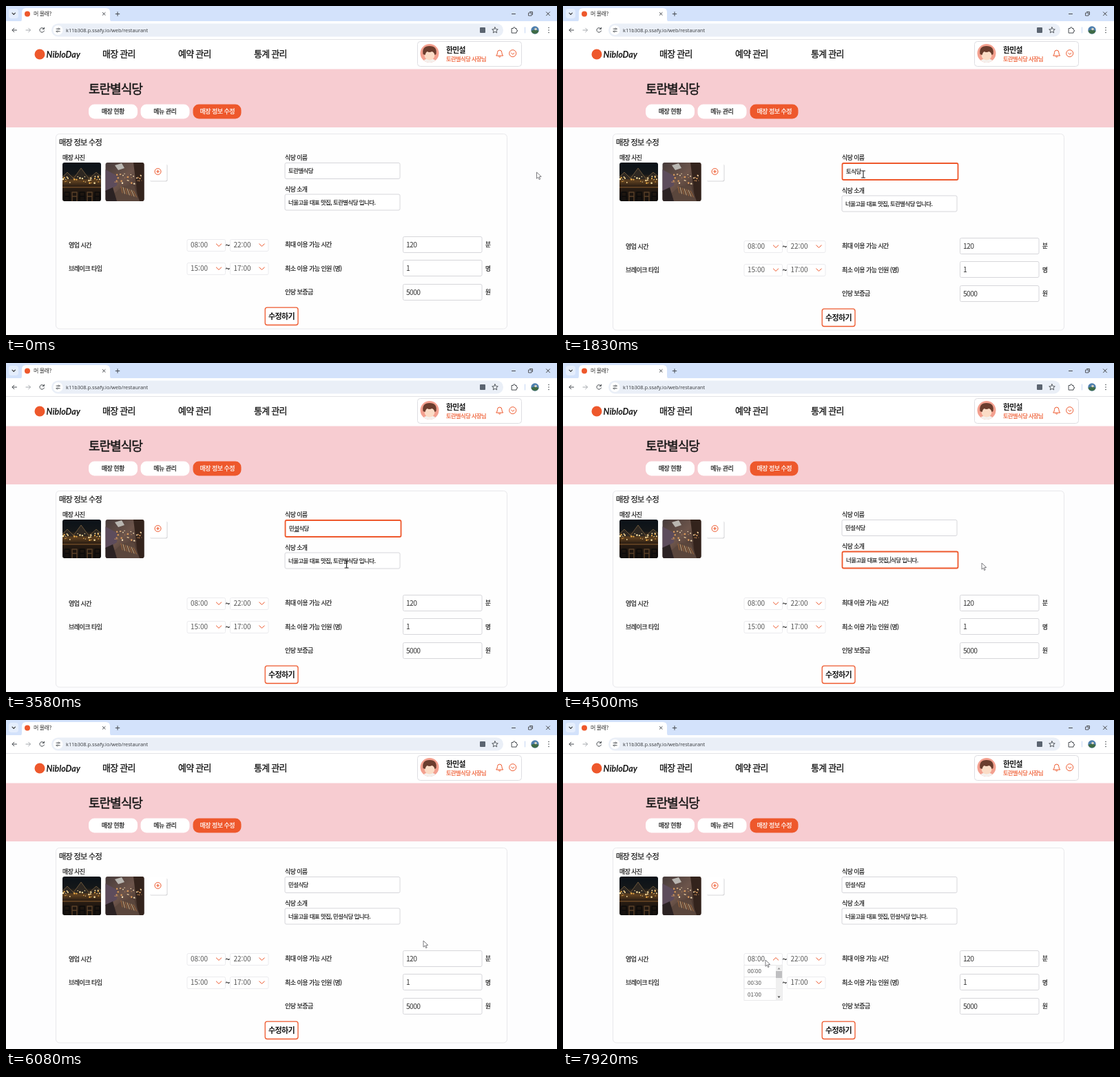
An HTML page that plays this animation: 800x477 px, repeating every 8 s.

```html
<!DOCTYPE html>
<html lang="ko">
<head>
<meta charset="utf-8">
<title>매장 정보 수정</title>
<style>
html, body { margin: 0; width: 100%; height: 100%; overflow: hidden; background: #fff; }
svg { display: block; width: 800px; height: 477px; }
text { font-family: "Noto Sans CJK KR", "Noto Sans CJK", "Noto Sans KR", sans-serif; letter-spacing: -.06em; white-space: pre; }
.num { letter-spacing: 0; }
.url { font-family: "Open Sans", sans-serif; letter-spacing: 0; }
.brand { font-family: Lato, sans-serif; font-style: italic; letter-spacing: 0; }
</style>
</head>
<body>
<svg id="stage" viewBox="0 0 800 477">
  <defs>
    <linearGradient id="night" x2="0" y2="1">
      <stop offset="0" stop-color="#0b1219"/><stop offset=".3" stop-color="#141719"/>
      <stop offset=".48" stop-color="#5e4020"/><stop offset=".62" stop-color="#2a1d13"/>
      <stop offset="1" stop-color="#120f0d"/>
    </linearGradient>
    <linearGradient id="hall" x2="1" y2="1">
      <stop offset="0" stop-color="#453a3a"/><stop offset=".45" stop-color="#6d554b"/>
      <stop offset="1" stop-color="#2a1c16"/>
    </linearGradient>
    <clipPath id="clipA"><rect x="82" y="227" width="56" height="56" rx="3"/></clipPath>
    <clipPath id="clipB"><rect x="144.500" y="227" width="56" height="56" rx="3"/></clipPath>
    <clipPath id="face"><circle cx="615" cy="68.500" r="13.500"/></clipPath>
  </defs>
</svg>
<script>
const NS = 'http://www.w3.org/2000/svg';
const LOOP = 8000;
const ORANGE = '#ee582c', INK = '#161616', GREY = '#474b50', EDGE = '#d6d6da';
const SHOP = '토란별', NEXT = '민설', INTRO = '너울고을 대표 맛집, ';
const stage = document.getElementById('stage');
let layer = stage;

function el(tag, attrs) {
  const node = document.createElementNS(NS, tag);
  for (const k in attrs) node.setAttribute(k, attrs[k]);
  layer.appendChild(node);
  return node;
}
const rect = (x, y, width, height, fill, rx = 0, more) =>
  el('rect', { x, y, width, height, fill, rx, ...more });
const circle = (cx, cy, r, fill, more) => el('circle', { cx, cy, r, fill, ...more });
const line = (d, stroke = GREY, width = 1, more) =>
  el('path', { d, stroke, fill: 'none', 'stroke-width': width, 'stroke-linecap': 'round', 'stroke-linejoin': 'round', ...more });
const shape = (d, fill, more) => el('path', { d, fill, ...more });
const box = (x, y, w, h, rx, stroke, width = 1) =>
  rect(x, y, w, h, '#fff', rx, { stroke, 'stroke-width': width });
function text(x, mid, size, str, fill = INK, more = {}) {
  const node = el('text', { x, y: mid + size * .37, 'font-size': size, fill, ...more });
  // a hairline outline stands in for the medium weight
  if (more['font-weight'] === 500) {
    node.setAttribute('stroke', fill);
    node.setAttribute('stroke-width', size * .022);
  }
  node.textContent = str;
  return node;
}
function group(parent = stage, attrs) {
  layer = parent;
  return layer = el('g', attrs);
}
const MED = { 'font-weight': 500 }, BOLD = { 'font-weight': 700 };
const NUM = { class: 'num' }, MID = { 'text-anchor': 'middle', 'font-weight': 500 };

function random(seed) {
  return () => (seed = (seed * 16807) % 2147483647) / 2147483647;
}

function drawBrowser() {
  rect(0, 0, 800, 24, '#d3e2fb');
  rect(4, 4, 14, 14, '#e5eefd', 4);
  line('M9 10.2l2.200 2.200 2.200-2.200', '#333', 1.1);
  shape('M19 23q4 0 4-4V9q0-6 6-6H145q6 0 6 6v10q0 4 4 4z', '#fff');
  circle(31, 11.5, 4, ORANGE);
  text(40, 11.5, 8, '머 물래?', '#333');
  line('M140.300 9.500l3.800 3.800m0-3.800l-3.800 3.800');
  line('M159.200 11.500h5.600m-2.800-2.800v5.600');
  line('M734.500 11.500h5', '#333', .9);
  line('M759 10h4v4h-4zM760.500 8.500h4v4', '#333', .8);
  line('M784.500 8.800l5 5m0-5l-5 5', '#333', .9);
  rect(0, 22, 800, 26, '#fff');
  line('M0 48.500H800', '#e3e3e6');
  line('M15.500 35H9m2.800-2.800L9 35l2.800 2.800');
  line('M29 35h6.500m-2.800-2.800L35.500 35l-2.800 2.800', '#a4a8ad');
  line('M55 33a3.300 3.300 0 1 0 .4 3M55.400 31.200V33.400H53.200');
  rect(66, 25.5, 656, 19, '#eaeff7', 9.5);
  circle(75.500, 35, 7, '#fff');
  line('M73 33.200h2m3 0h.5M72.800 36.800h.5m3 0h2', GREY, .9);
  circle(76.500, 33.2, 1, 'none', { stroke: GREY, 'stroke-width': .9 });
  circle(74.500, 36.8, 1, 'none', { stroke: GREY, 'stroke-width': .9 });
  text(87, 34.8, 7.4, 'k11b308.p.ssafy.io/web/restaurant', '#33363a', { class: 'url' });
  rect(688, 31, 8, 8, '#5b6470', 1);
  line('M710 30.800l1.300 2.800 3 .3-2.300 2 .7 3-2.700-1.600-2.700 1.600.7-3-2.300-2 3-.3z', GREY, .9);
  line('M734.500 32.500h2q0-1.800 1.300-1.800t1.300 1.800h2v2.200q1.600 0 1.600 1.200t-1.600 1.200v2h-6.600z', GREY, 1);
  line('M753.500 31v8', '#c6d7f3', 1);
  circle(768, 35, 5.700, '#4e7fae');
  shape('M762.500 36q5-3 11 0a5.700 5.700 0 0 1-11 0z', '#3f6b46');
  circle(769, 33.500, 1.800, '#d8d2c0');
  [31.500, 35, 38.500].forEach(y => circle(788, y, .8, GREY));
}

function drawHeader() {
  rect(0, 49, 800, 43, '#fff');
  circle(49, 70, 7.5, ORANGE);
  text(58.500, 70, 12.5, 'NibloDay', '#151515', { class: 'brand', 'font-weight': 700 });
  ['매장 관리', '예약 관리', '통계 관리'].forEach((s, i) => text(140 + 110 * i, 69.5, 13, s, INK, MED));
  box(597.500, 51.5, 151, 36, 4, '#dedee2');
  group(stage, { 'clip-path': 'url(#face)' });
  circle(615, 68.500, 14, '#f3a08f');
  rect(606, 77, 18, 8, '#f4f1ee', 5);
  circle(615, 71, 7.5, '#fbdcc6');
  shape('M605.500 70q-2-12 9.500-12t9.500 12l-2 1q-1-4-4-5-4 2-7 0-2 1-3 5z', '#6b3d2e');
  layer = stage;
  text(639, 64, 10.8, '한민설', INK, BOLD);
  text(639, 77, 8.2, SHOP + '식당 사장님', ORANGE, MED);
  line('M712 71.800q1.500-1.400 1.500-4.300a3.200 3.400 0 0 1 6.400 0q0 2.900 1.500 4.300zM715.500 73.700q1.200 1 2.400 0', ORANGE, 1);
  circle(735.700, 68.700, 5, '#fff', { stroke: ORANGE });
  line('M733.500 68l2.200 2.200 2.200-2.200', ORANGE);

  rect(0, 91.500, 800, 84.5, '#f7ccd1');
  text(120, 120.7, 18.1, SHOP + '식당', INK, MED);
  [['매장 현황', 120], ['메뉴 관리', 195.5], ['매장 정보 수정', 271.5]].forEach(([s, x], i) => {
    rect(x, 142.5, 71 - (i > 1), 21, i > 1 ? ORANGE : '#fff', 8.5);
    text(x + 35.3, 153, 9, s, i > 1 ? '#fff' : INK, MID);
  });
}

function drawPhotos() {
  let rnd = random(41);
  group(stage, { 'clip-path': 'url(#clipA)' });
  rect(82, 227, 56, 56, 'url(#night)');
  [[80, 18, 241], [98, 22, 235], [121, 20, 241]].forEach(([x, w, y]) => {
    shape(`M${x} 251l${w / 2} ${y - 251} ${w / 2} ${251 - y}z`, '#2e2822');
    line(`M${x} 250l${w / 2} ${y - 250} ${w / 2} ${250 - y}`, '#8d6f47', .7);
  });
  for (let i = 0; i < 32; i++)
    circle(83 + rnd() * 54, 247 + rnd() * 10, .5 + rnd() * .9, rnd() < .5 ? '#e8a846' : '#ffe2a0');
  rect(82, 262, 56, 1.5, '#6b4826');
  for (let i = 0; i < 5; i++)
    line(`M${85 + i * 11} 283v-13h7v13m-7-7h7`, i % 2 ? '#5a4028' : '#0b0a0a', 1.4);

  rnd = random(97);
  group(stage, { 'clip-path': 'url(#clipB)' });
  rect(144, 227, 57, 56, 'url(#hall)');
  shape('M144 237l17 9v14l-17 10z', '#5d4c5c');
  shape('M158 231l10-3 4 7-9 3z', '#b9b6b1');
  shape('M185 227h16v56h-9z', '#33231c');
  shape('M144 283l26-22 16 0 8 22z', '#5a463c');
  for (let i = 0; i < 36; i++)
    circle(158 + rnd() * 40, 243 + rnd() * 16, .4 + rnd() * .9, rnd() < .6 ? '#d99a5c' : '#fbe3b8');
  for (let i = 0; i < 7; i++) {
    const x = 167 + i * 3;
    line(`M${x} ${262 + i}l${2 + i * .4} 9`, i % 2 ? '#d9b383' : '#a96c3c', .9);
  }
  shape('M144 268l11-5 6 20h-17z', '#2b2223');
  layer = stage;
  rect(209, 229.500, 25.5, 25, '#d5d5d8', 2);
  rect(208, 228, 25.5, 25.5, '#fff', 2);
  circle(220.500, 240, 4.5, '#fff', { stroke: ORANGE });
  line('M218.500 240h4m-2-2v4', ORANGE);
}

const FIELDS = [], LOW = {};
function makeField(labelText, labelY) {
  const label = text(405, labelY, 8.9, labelText, INK, MED);
  const frame = box(405, 0, 167, 23, 2, EDGE);
  const value = text(410, 0, 8.4, '', INK, MED);
  const caret = rect(0, 0, .8, 9.5, INK);
  const under = rect(0, 0, 0, .8, INK);
  return { label, frame, value, caret, under };
}

function select(x, y, value) {
  box(x, y - 8, 55.5, 17, 2, '#ebebee');
  text(x + 5, y, 10, value, '#555', NUM);
  return line(`M${x + 42.3} ${y - 1.6}l3.700 3.500 3.700-3.500`, ORANGE, 1);
}

function drawForm() {
  rect(0, 176, 800, 301, '#fdfdfe');
  LOW.card = box(72.500, 185.5, 655, 282.5, 5, '#e8e8eb');
  LOW.card.setAttribute('fill', '#fefefe');
  text(77, 198, 11.1, '매장 정보 수정', INK, MED);
  text(82, 220, 8.9, '매장 사진', INK, MED);
  drawPhotos();
  FIELDS.push(makeField('식당 이름', 220), makeField('식당 소개', 265.7));

  LOW.group = group();
  text(91, 346.3, 9, '영업 시간', INK, MED);
  text(91, 380.5, 9, '브레이크 타임', INK, MED);
  LOW.chevron = select(263, 346.5, '08:00');
  select(325.500, 346.5, '22:00');
  select(263, 380.5, '15:00');
  select(325.500, 380.5, '17:00');
  [346.5, 380.5].forEach(y => text(318.800, y, 11.5, '~', INK, MED));
  [['최대 이용 가능 시간', '120', '분'], ['최소 이용 가능 인원 (명)', '1', '명'], ['인당 보증금', '5000', '원']]
    .forEach(([label, value, unit], i) => {
      const y = 346 + 34.5 * i;
      text(405, y, 9, label, INK, MED);
      box(576.500, Math.floor(y) - 11.5, 114.5, 23, 2, EDGE);
      text(581, y, 10.3, value, '#333');
      text(696, y, 8.6, unit, INK, MED);
    });
  box(376.200, 437.2, 47.8, 25.3, 3, ORANGE, 1.3);
  text(400, 450, 11, '수정하기', INK, { ...MID, ...BOLD });
}

function drawList() {
  const list = group();
  ['00:00', '00:30', '01:00'].forEach((s, i) => {
    box(263, 355.5 + 17 * i, 55.5, 17, 0, '#e4e4e7', .8);
    text(268, 364 + 17 * i, 8, s, '#4b4b4b', NUM);
  });
  rect(309, 355.5, 9.5, 51, '#f0f0f0');
  rect(309, 364, 9, 10, '#bfbfc1');
  shape('M311.500 361.500h4l-2-2.500z', '#8d8d8d');
  shape('M311.500 400.500h4l-2 2.500z', '#444');
  return list;
}

drawBrowser();
drawHeader();
drawForm();
const list = drawList();
const cursor = group();
const arrow = shape('M0 0v9.200l2.200-2 1.500 3.400 1.500-.7-1.500-3.200 3-.3z', '#fff',
  { stroke: '#6b6b70', 'stroke-width': .9, 'stroke-linejoin': 'round' });
const beam = line('M-2.500-5H2.500M0-5V5M-2.500 5H2.500', '#222', 1.1);

// time, text before the caret, syllable being composed, caret shown
const compose = (times, head) =>
  ['ㅁ', '미', '민', 'ㅅ', '서', '설'].map((c, i) => [times[i], head + (i > 2 ? '민' : ''), c, 0]);
const TYPING = [
  [[0, SHOP, '', 0], [1400, SHOP, '', 1], [1580, '토란', '', 1], [1750, '토', '', 0], [1915, '', '', 1],
    ...compose([2170, 2250, 2330, 2500, 2585, 2665], ''), [3670, NEXT, '', 0]],
  [[0, INTRO + SHOP, '', 0], [3670, INTRO + SHOP, '', 1], [4170, INTRO + '토란', '', 1],
    [4250, INTRO + '토', '', 1], [4420, INTRO, '', 1],
    ...compose([4600, 4750, 4830, 5000, 5083, 5165], INTRO), [5420, INTRO + NEXT, '', 0]]
];
const TAIL = ['식당', '식당 입니다.'];
const FOCUS = [[0, -1], [1400, 0], [3670, 1], [5420, -1]];
const MOUSE = [
  [0, 770.5, 241], [150, 770.5, 241], [830, 440, 244], [1250, 438, 244], [1700, 436, 244],
  [2750, 436, 244], [3400, 494.5, 292], [3680, 494.5, 292], [3990, 608, 290],
  [5150, 608, 290], [5600, 606, 320], [6250, 606, 320], [7050, 294, 348], [LOOP, 294, 348]
];
const OPEN_AT = 7580;

const at = (table, t) => table.reduce((hit, row) => row[0] <= t ? row : hit);
function mouseAt(t) {
  const i = MOUSE.findIndex(m => m[0] > t);
  const [a, b] = [MOUSE[i - 1], MOUSE[i]];
  const p = (t - a[0]) / (b[0] - a[0]), e = p * p * (3 - 2 * p);
  return [a[1] + (b[1] - a[1]) * e, a[2] + (b[2] - a[2]) * e];
}
function set(node, attrs) {
  for (const k in attrs) node.setAttribute(k, attrs[k]);
}

function showField(i, t, focus) {
  const { label, frame, value, caret, under } = FIELDS[i];
  const on = focus === i, drop = i && focus === 0 ? 2 : 0;
  const top = (i ? 273 : 227.5) + drop;
  const [, head, part, blink] = at(TYPING[i], t);
  const mid = top + (on ? 12.5 : 11.5);
  label.setAttribute('transform', `translate(0 ${drop})`);
  set(frame, {
    x: on ? 405.5 : 405, y: on ? top + .5 : top, width: on ? 168 : 167, height: on ? 24 : 23,
    stroke: on ? ORANGE : EDGE, 'stroke-width': on ? 1.8 : 1
  });
  set(value, { x: on ? 411 : 410, y: mid + 3.1 });
  const str = head + part + TAIL[i];
  if (value.textContent !== str) value.textContent = str;
  const x = value.getStartPositionOfChar(head.length).x;
  const end = value.getStartPositionOfChar(head.length + part.length).x;
  set(caret, { x: x - .6, y: mid - 5, opacity: blink });
  set(under, { x, y: mid + 4.3, width: end - x });
}

function render(t) {
  const focus = at(FOCUS, t)[1], shift = focus < 0 ? 0 : 2;
  showField(0, t, focus);
  showField(1, t, focus);
  LOW.card.setAttribute('height', 282.5 + shift);
  LOW.group.setAttribute('transform', `translate(0 ${shift})`);
  const open = t >= OPEN_AT;
  list.style.display = open ? '' : 'none';
  LOW.chevron.setAttribute('transform', open ? 'translate(0 693) scale(1 -1)' : '');
  const [x, y] = mouseAt(t);
  const overField = x > 405 && x < 573 && (y > 227 && y < 252 || y > 273 && y < 298);
  cursor.setAttribute('transform', `translate(${x} ${y})`);
  arrow.style.display = overField ? 'none' : '';
  beam.style.display = overField ? '' : 'none';
}

const start = performance.now();
function tick() {
  render((performance.now() - start) % LOOP);
  requestAnimationFrame(tick);
}
tick();
</script>
</body>
</html>
```
